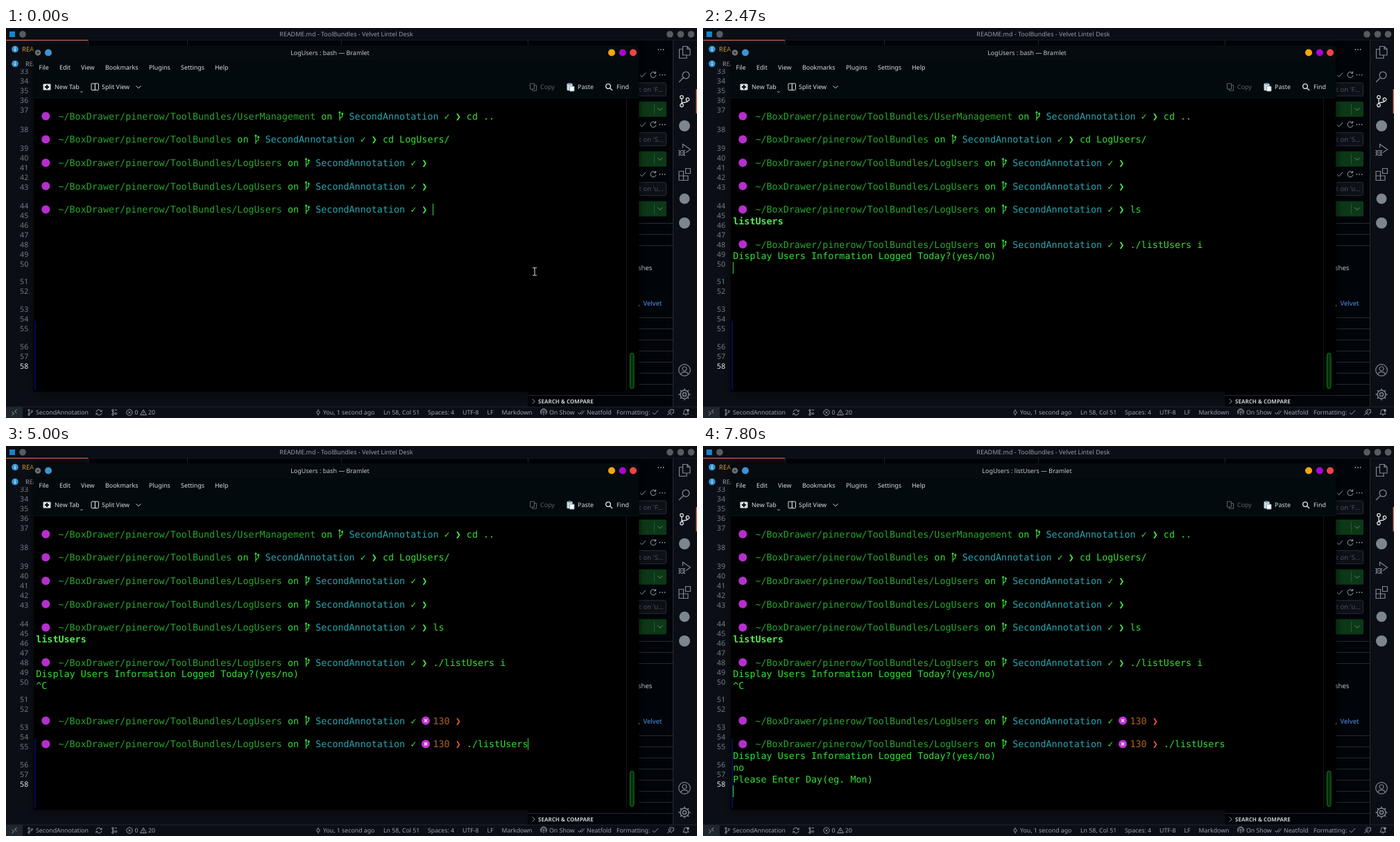
An HTML page with a canvas for the animation above (8 s loop, 996x562 px).

```html
<!DOCTYPE html>
<html lang="en">
<head>
<meta charset="utf-8">
<title>Terminal session</title>
<style>
  html, body { margin: 0; width: 100%; height: 100%; overflow: hidden; background: #0d1117; }
  canvas { display: block; }
</style>
</head>
<body>
<canvas id="stage" width="996" height="562"></canvas>
<script>
const W = 996, H = 562, LOOP = 8000;
const UI = '"Noto Sans", sans-serif';
const MONO = '"DejaVu Sans Mono", monospace';
const stage = document.getElementById('stage').getContext('2d');
const backdrop = document.createElement('canvas');
backdrop.width = W;
backdrop.height = H;
let ctx = backdrop.getContext('2d');

// ---- drawing helpers ----
function rect(x, y, w, h, color) {
  ctx.fillStyle = color;
  ctx.fillRect(x, y, w, h);
}
function disc(x, y, r, color) {
  ctx.fillStyle = color;
  ctx.beginPath();
  ctx.arc(x, y, r, 0, 7);
  ctx.fill();
}
function box(x, y, w, h, r, fill, stroke) {
  ctx.beginPath();
  ctx.roundRect(x, y, w, h, r);
  if (fill) { ctx.fillStyle = fill; ctx.fill(); }
  if (stroke) { ctx.strokeStyle = stroke; ctx.lineWidth = 1; ctx.stroke(); }
}
// Text whose capitals are centred on cy.
function label(text, x, cy, color, size = 8.95, align = 'left', weight = '') {
  ctx.font = `${weight} ${size}px ${UI}`;
  ctx.textAlign = align;
  ctx.fillStyle = color;
  ctx.fillText(text, x, cy + size * 0.36);
}
function icon(x, y, path, color, width = 1) {
  ctx.save();
  ctx.translate(x, y);
  ctx.strokeStyle = color;
  ctx.lineWidth = width;
  ctx.stroke(new Path2D(path));
  ctx.restore();
}
const ring = (x, y, r) =>
  `M${x + r} ${y}a${r} ${r} 0 1 1 ${-2 * r} 0a${r} ${r} 0 1 1 ${2 * r} 0`;
const CHECK = 'M-4 0L-1.5 3L4-3';
const CHEVRON_DOWN = 'M-3.5-1.7L0 1.8L3.5-1.7';
const REFRESH = 'M3.2-2.6A4 4 0 1 0 4 .6M3.6-5V-2.2H.8';
const LENS = ring(2, -2, 4.9) + 'M-1.5 1.5L-8 8';
const BRANCH = ring(-2, -3.2, 1.2) + ring(-2, 3.2, 1.2) + ring(2.4, -1.6, 1.2) +
  'M-2-2V2M2.4-.4C2.4 1.4-2 .4-2 2';

function dots(x, y, color) {
  for (const d of [-3.6, 0, 3.6]) disc(x + d, y, 0.85, color);
}

// ---- editor behind the terminal ----
const FG = '#9aa2aa', LINE = '#262b32', PANEL = '#010409', BASE = '#0b0f15';

function drawEditor() {
  rect(0, 0, W, H, BASE);
  rect(752, 18, 209, 528, PANEL);
  rect(119, 18, 633, 26, PANEL);
  rect(0, 17, W, 1, '#161b21');
  rect(0, 17, 118, 1.2, '#c96a55');
  for (const x of [118, 261, 483, 752]) rect(x, 18, 1, 26, LINE);

  rect(5, 5, 8, 8, '#1684cc');
  disc(24, 9, 4.8, '#585c60');
  for (const x of [957, 972.5, 987.5]) disc(x, 9, 4.8, '#585c60');
  label('README.md - ToolBundles - Velvet Lintel Desk', 490.5, 9, '#959ca3', 8.95, 'center');

  for (const y of [30.5, 51.5]) {
    disc(13, y, 4.8, '#3596d3');
    rect(12.4, y - 0.8, 1.3, 3.4, '#e6f2fa');
    rect(12.4, y - 2.8, 1.3, 1.2, '#e6f2fa');
  }
  label('README.md', 23, 30.5, '#cf9a38', 9.5);
  label('README.md', 28, 51.5, FG, 9.2);

  const extraGap = { 38: 13.85, 39: 13.7, 44: 13.85, 51: 12.1, 53: 12, 56: 12.1 };
  ctx.save();
  ctx.beginPath();
  ctx.rect(0, 59, 40, 480);
  ctx.clip();
  for (let n = 33, y = 62.5; n <= 58; n++, y += 13.87) {
    y += extraGap[n] || 0;
    label(n, 32.2, y, n === 58 ? '#e6edf3' : '#727a83', 10.6, 'right');
  }
  ctx.restore();
}

function drawSidebar() {
  dots(944, 31, '#c9d1d9');
  ["t on 'F...", "t on 'S...", "t on 'u..."].forEach((hint, i) => {
    const y = 67.5 + i * 71.7;
    icon(918, y, CHECK, FG);
    icon(933, y, REFRESH, FG);
    dots(946, y, FG);
    box(880.5, y + 11.5, 71, 19, 2, '#0d1117', '#272d35');
    label(hint, 912.5, y + 21, '#4b525b', 9.5);
    box(880, y + 38.5, 72, 22, 2, '#0c3817');
    rect(934, y + 42, 1, 15, '#2a5834');
    icon(943, y + 49.5, CHEVRON_DOWN, '#70877a');
  });
  for (const y of [281, 297, 313]) rect(752, y, 209, 1, LINE);
  for (let i = 0; i < 8; i++) rect(752, Math.round(417 + i * 16), 209, 1, LINE);
  label('shes', 911, 346, '#c3cad1', 9.5);
  label(',', 911.5, 397, '#c3cad1', 9.5);
  label('Velvet', 918.5, 397, '#4f97ea', 9.5);
  icon(760.5, 538, 'M-1.7-3.5L1.8 0L-1.7 3.5', FG);
  label('SEARCH & COMPARE', 767, 538, '#c3cad1', 8, 'left', 'bold');
}

function drawActivityBar() {
  rect(961, 18, 35, 528, BASE);
  rect(961, 18, 1, 528, LINE);
  rect(994.6, 88, 1.4, 35, '#d87560');
  const x = 978, idle = '#7d858e';
  icon(x, 35, 'M-2.5-8.5H4L8-4.5V4H-2.5ZM4-8.5V-4.5H8M-2.5-4.5H-7.5V8.5H3V4', idle, 1.2);
  icon(x, 70, LENS, idle, 1.3);
  icon(x, 105.5, ring(-4, -5.8, 2.3) + ring(-4, 5.8, 2.3) + ring(4.5, -2.5, 2.3) +
    'M-4-3.5V3.5M4.5-.2C4.5 3-4 .5-4 3.5', '#dde3e9', 1.3);
  disc(x, 141, 8, idle);
  icon(x, 176, 'M-2.5-3V-8.5L8.5-1L2 3.5' + ring(-3.8, 4, 3.3) +
    'M-7 4H-.5M-8.5 0L-6.5 2M.8 0L-1.2 2M-8.8 4H-7M-.5 4H1.2M-8.5 8L-6.5 6M.8 8L-1.2 6', idle, 1.2);
  icon(x, 211, 'M-8-4.5H-1.5V8.5H-8ZM-8 2H5V8.5H-1.5M1.5-8.5H8.5V-1.5H1.5Z', idle, 1.2);
  disc(x, 246, 7.5, idle);
  disc(x, 281, 8, idle);
  icon(x, 493, ring(0, 0, 8.3) + ring(0, -2, 3) + 'M-5.3 6.3C-4 1.5 4 1.5 5.3 6.3', idle, 1.2);
  let gear = ring(0, 0, 2.6) + ring(0, 0, 6);
  for (let i = 0; i < 8; i++) {
    const c = Math.cos(i * Math.PI / 4), s = Math.sin(i * Math.PI / 4);
    gear += `M${c * 6} ${s * 6}L${c * 8.6} ${s * 8.6}`;
  }
  icon(x, 528, gear, idle, 1.5);
}

function drawStatusBar() {
  const y = 554;
  rect(0, 546, W, 16, BASE);
  rect(0, 545.5, W, 1, '#20252c');
  rect(0, 546, 24, 16, '#20262d');
  icon(12, y, 'M-3.5-1L-.5 1.5L-3.5 4M3.5-4L.5-1.5L3.5 1', FG);
  icon(35, y, BRANCH, FG, 0.9);
  icon(134, y, 'M-4-.5A4 4 0 0 1 3.6-1.5M4 .5A4 4 0 0 1-3.6 1.5M1.6-1.5H4.2V-3.6M-1.6 1.5H-4.2V3.6', FG, 0.9);
  icon(156, y, ring(-2, -3, 1.3) + ring(-2, 3, 1.3) + ring(2.5, 1.6, 1.3) + 'M-2-1.7V1.7M-2-1.7C-1 1 0 1.6 1.2 1.6M1-3.5H4', FG, 0.9);
  icon(178, y, ring(0, 0, 4.2) + 'M-1.6-1.6L1.6 1.6M1.6-1.6L-1.6 1.6', FG, 0.9);
  icon(198, y, 'M0-4L4.4 3.6H-4.4ZM0-1.2V1.4M0 2V2.8', FG, 0.9);
  icon(450, y, ring(0, 0, 2.2) + 'M0-4.5V-2.2M0 2.2V4.5', FG, 0.9);
  icon(775, y, ring(0, -0.8, 1) + 'M0 .4V4M-2.2 1.4A3.2 3.2 0 1 1 2.2 1.4M-2.8 3A4.6 4.6 0 1 1 2.8 3', FG, 0.9);
  icon(829, y, 'M-4.5 0L-2.5 2.6L2-2.6M-.5 1.4L.6 2.6L4.8-2.6', FG, 0.9);
  icon(936, y, CHECK, FG, 0.9);
  icon(958, y, ring(-1.5, -0.8, 1.6) + 'M-4.4 4C-4 1 1 1 1.4 4M-1.5-4H4.3V.6H2.6L1.6 2', FG, 0.9);
  icon(980, y, 'M-4 2.4H4L2.8.6V-1.4A2.8 2.8 0 0 0-2.8-1.4V.6ZM-1 4H1', FG, 0.9);
  disc(983, y - 3, 1.7, FG);
  const items = {
    43: 'SecondAnnotation', 185.5: '0', 205: '20', 457: 'You, 1 second ago', 544: 'Ln 58, Col 51',
    608: 'Spaces: 4', 658: 'UTF-8', 693.5: 'LF', 714.5: 'Markdown', 783: 'On Show',
    837: 'Neatfold', 880: 'Formatting:'
  };
  for (const x in items) label(items[x], +x, y, FG, 8.75);
}

// ---- terminal window ----
function drawWindow() {
  ctx.save();
  ctx.shadowColor = 'rgba(0,0,0,.8)';
  ctx.shadowBlur = 10;
  box(40, 25, 872, 499, [6, 6, 2, 2], '#020a0d');
  ctx.restore();
  box(40, 25, 872, 21, [6, 6, 0, 0], '#060b0f');
  rect(40, 100.5, 872, 423.5, '#000');
  rect(40, 100, 872, 1, '#0a1316');

  disc(46, 35.5, 4.3, '#6b7074');
  disc(46, 35.5, 1.6, '#33383b');
  disc(61, 35.5, 5, '#3c93d2');
  disc(873, 35.5, 5, '#f9a50c');
  disc(888.8, 35.5, 5, '#ab06d4');
  disc(904, 35.5, 5, '#ef4545');

  const ink = '#d9dfe2', faint = '#5b6265';
  const menu = { 47.5: 'File', 77: 'Edit', 108: 'View', 143: 'Bookmarks', 206: 'Plugins', 252: 'Settings', 301: 'Help' };
  for (const x in menu) label(menu[x], +x, 57, ink);

  const y = 85;
  box(53.5, 80.5, 11, 9, 1, ink);
  rect(58, 82, 2, 6, '#020a0d');
  rect(56, 84, 6, 2, '#020a0d');
  label('New Tab', 70, y, ink);
  icon(109, 92, 'M-1.6-.8L0 .8L1.6-.8', ink, 0.9);
  box(123, 80, 10.5, 9.5, 1, null, ink);
  rect(127.8, 80, 1.2, 9.5, ink);
  label('Split View', 138, y, ink);
  icon(191, y, CHEVRON_DOWN, ink);
  icon(760, y, 'M-4.5-5H1.5V3H-4.5ZM1.5-2.5H4.5V5.2H-1.5V3', faint);
  label('Copy', 770, y, faint);
  box(808.5, 80, 8, 10, 1, '#cfd8dc');
  rect(810.5, 79, 4, 2.5, '#4a8fb8');
  box(812.5, 84, 6.5, 7, 0.5, '#fff', '#7fa8bd');
  label('Paste', 824, y, ink);
  icon(869, y, ring(-1, -1, 3.4) + 'M1.6 1.6L5 5', ink, 1.4);
  label('Find', 880, y, ink);

  rect(894, 101, 1, 421, '#121a15');
  box(899.5, 468.5, 5.5, 51, 2.7, '#04300a', '#0f7a20');
  rect(41, 422, 2, 100, '#070c52');
}

const COL = 8.06, ROW = 16.8, LEFT = 43.2, TOP = 127;
const colX = c => LEFT + c * COL;
const rowY = r => TOP + r * ROW;
const GREEN = '#34de34', PATH = '#29a52f', TEAL = '#28a6af';

function mono(text, row, col, color = GREEN, weight = '') {
  ctx.font = `${weight} ${COL / 0.602}px ${MONO}`;
  ctx.textAlign = 'left';
  ctx.fillStyle = color;
  [...text].forEach((ch, i) => {
    if (ch !== ' ') ctx.fillText(ch, colX(col + i), rowY(row) + 4.8);
  });
}

const ROOT = '~/BoxDrawer/pinerow/ToolBundles';

function prompt(row, dir, failed) {
  const path = ROOT + dir, y = rowY(row);
  let col = 4 + path.length + 1;
  disc(57.3, y, 6, '#b62fce');
  mono(path, row, 4, PATH);
  mono('on', row, col);
  icon(colX(col + 3) + 4, y, 'M-1.5-6.5V6.5M-1.5 3.5L2.2 .5V-4M.8-2.6L2.2-4.6L3.6-2.6M-2.9-4.5L-1.5-6.5L-.1-4.5', '#3be83b', 1.1);
  mono('SecondAnnotation', row, col + 5, TEAL);
  mono('✓', row, col + 22, '#46e346');
  col += 24;
  if (failed) {
    disc(605, y, 6, '#c52fd6');
    icon(605, y, 'M-2-2L2 2M2-2L-2 2', '#f3e3f6', 1.5);
    mono('130', row, col + 2, '#ad621f');
    col += 6;
  }
  mono('❯', row, col, failed ? '#ee5a3c' : '#48ee48');
}

const QUESTION = 'Display Users Information Logged Today?(yes/no)';
const LOGS = '/LogUsers';

// [time, draw]: what the shell prints and when
const printed = [
  [0, () => {
    prompt(0, '/UserManagement');
    mono('cd ..', 0, 77);
    prompt(2, '');
    mono('cd LogUsers/', 2, 62);
    for (const row of [4, 6, 8]) prompt(row, LOGS);
  }],
  [600, () => mono('listUsers', 9, 0, '#52ea52', 'bold')],
  [670, () => prompt(11, LOGS)],
  [2470, () => mono(QUESTION, 12, 0)],
  [3530, () => prompt(16, LOGS, true)],
  [3670, () => prompt(18, LOGS, true)],
  [5200, () => mono(QUESTION, 19, 0)],
  [6930, () => mono('Please Enter Day(eg. Mon)', 21, 0)]
];

// [time, row, column, text typed so far]; the caret follows the text
const typed = [
  [0, 8, 71, ''], [70, 8, 71, 'l'], [270, 8, 71, 'ls'], [530, 9, 0, ''], [600, 10, 0, ''],
  [670, 11, 71, ''], [1470, 11, 71, '.'], [1530, 11, 71, './'], [1870, 11, 71, './l'],
  [2000, 11, 71, './listUsers '], [2130, 11, 71, './listUsers i'], [2400, 12, 0, ''],
  [2470, 13, 0, ''], [3400, 13, 0, '^C'], [3530, 16, 77, ''], [3600, 17, 0, ''],
  [3670, 18, 77, ''], [3930, 18, 77, './listUsers i'], [4870, 18, 77, './listUsers '],
  [5000, 18, 77, './listUsers'], [5130, 19, 0, ''], [5200, 20, 0, ''],
  [6600, 20, 0, 'n'], [6730, 20, 0, 'no'], [6870, 21, 0, ''], [6930, 22, 0, '']
];
const FIRST_KEY = typed[1][0];

function render(t) {
  ctx.drawImage(backdrop, 0, 0);
  label(`LogUsers : ${t < 5470 ? 'bash' : 'listUsers'} — Bramlet`, 467, 35.5, '#c3cacd', 8.95, 'center');
  for (const [time, draw] of printed) if (time <= t) draw();

  const rows = new Map();
  let caret;
  for (const key of typed) {
    if (key[0] > t) break;
    rows.set(key[1], key);
    caret = key;
  }
  for (const [, row, col, text] of rows.values()) mono(text, row, col);
  rect(Math.floor(colX(caret[2] + caret[3].length)), Math.round(rowY(caret[1]) - 8), 1, 17, '#35dd35');

  // The pointer hides as soon as typing begins.
  if (t < FIRST_KEY) {
    icon(762, 351, 'M-3-5.5H-1L0-4.5L1-5.5H3M0-4.5V4.5M-3 5.5H-1L0 4.5L1 5.5H3', '#b9bec2', 1.2);
  }
}

ctx.textRendering = stage.textRendering = 'geometricPrecision';
drawEditor();
drawSidebar();
drawActivityBar();
drawStatusBar();
drawWindow();
ctx = stage;

const start = performance.now();
function tick() {
  render((performance.now() - start) % LOOP);
  requestAnimationFrame(tick);
}
tick();
</script>
</body>
</html>
```
